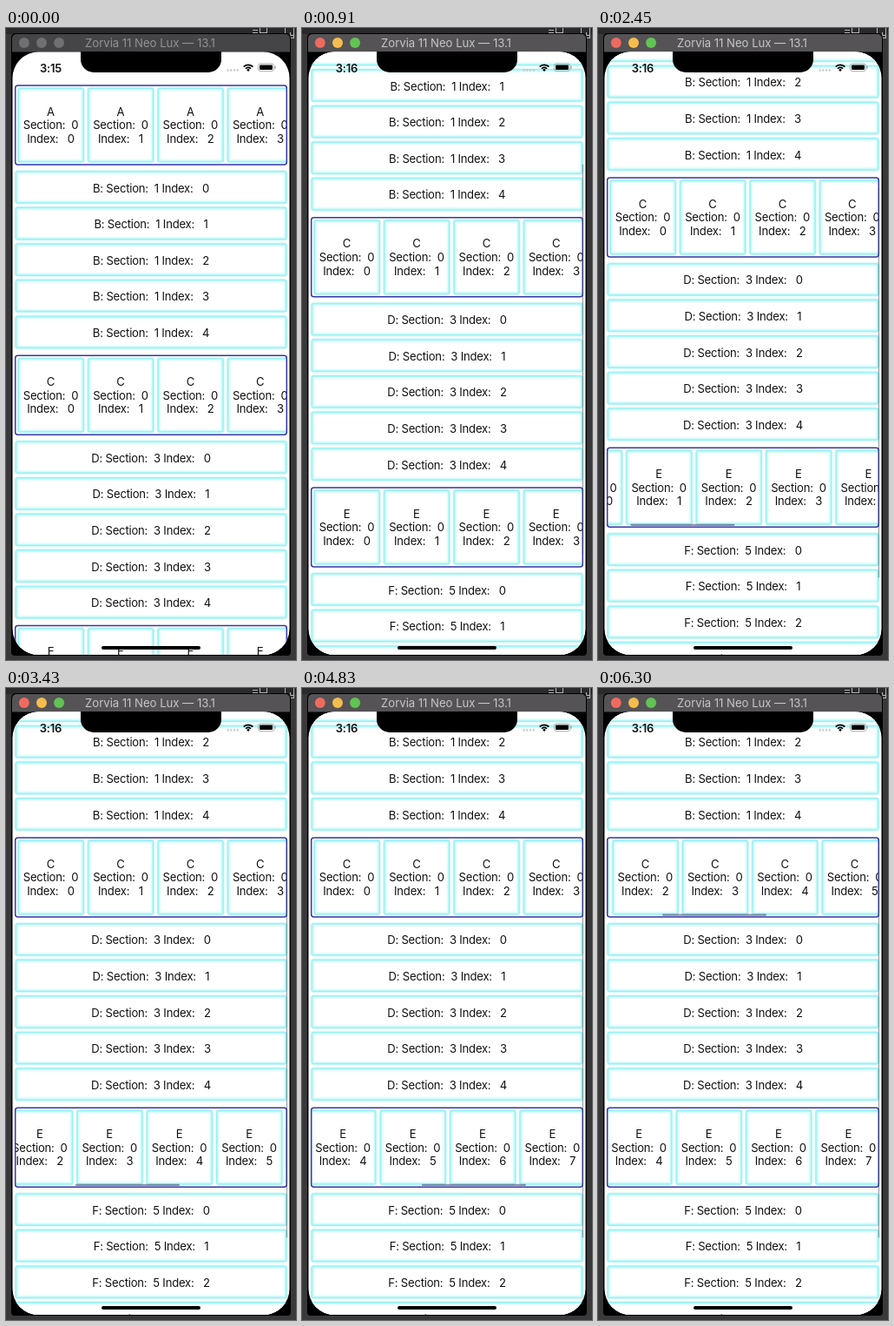
Animation, 334 px wide and 726 px high, one loop 6440 ms. Source, as an HTML page with a canvas:

```html
<!DOCTYPE html>
<html lang="en">
<head>
<meta charset="utf-8">
<style>
html, body { margin: 0; width: 100%; height: 100%; overflow: hidden; background: #39393b; }
canvas { display: block; }
</style>
</head>
<body>
<canvas id="stage" width="334" height="726"></canvas>
<script>
const ctx = document.getElementById('stage').getContext('2d');
const LOOP = 6440, STEP = 70;
const PERIOD = 310.3;      // one card strip plus its five rows
const ROW_PITCH = 41.6, CELL_PITCH = 80.4;
const SCROLL_STOP = 204.4;

function ease(t, start, end) {
  const u = Math.min(1, Math.max(0, (t - start) / (end - start)));
  return (1 - Math.cos(Math.PI * u)) / 2;
}

function roundPath(x, y, w, h, r) {
  ctx.beginPath();
  ctx.roundRect(x, y, w, h, r);
}

function box(x, y, w, h, r, color) {
  roundPath(x, y, w, h, r);
  ctx.fillStyle = color;
  ctx.fill();
}

function dot(x, y, r, color) {
  ctx.beginPath();
  ctx.arc(x, y, r, 0, Math.PI * 2);
  ctx.fillStyle = color;
  ctx.fill();
}

function label(text, x, y, color = '#111', weight = 400, size = 13.1, spacing = -0.22) {
  ctx.font = `${weight} ${size}px Inter, sans-serif`;
  ctx.letterSpacing = spacing + 'px';
  ctx.textAlign = 'center';
  ctx.textBaseline = 'alphabetic';
  ctx.fillStyle = color;
  ctx.fillText(text, x, y + 4.7);
}

// White tile with a cyan edge that fades inwards.
function tile(x, y, w, h) {
  box(x - 1, y - 1, w + 2, h + 2, 4, '#e2fafa');
  box(x, y, w, h, 3, '#fff');
  ctx.save();
  roundPath(x, y, w, h, 3);
  ctx.clip();
  for (const [width, alpha] of [[10, 0.05], [7, 0.1], [5, 0.17], [3, 0.36]]) {
    ctx.strokeStyle = `rgba(70, 228, 232, ${alpha})`;
    ctx.lineWidth = width;
    ctx.stroke();
  }
  ctx.restore();
}

function strip(letter, y, offset, showBar) {
  ctx.save();
  roundPath(10.5, y, 313, 92, 3);
  ctx.clip();
  for (let i = 0; i < 10; i++) {
    const x = 13.5 + i * CELL_PITCH - offset;
    if (x < -80 || x > 334) continue;
    tile(x, y + 3, 76.5, 86);
    label(letter, x + 38, y + 30.5);
    label('Section:  0', x + 38, y + 46.2);
    label('Index:   ' + i, x + 38, y + 61.8);
  }
  if (showBar) box(14 + offset * 0.38, y + 88, 120, 2.3, 1.1, 'rgba(70, 75, 110, .6)');
  ctx.restore();
  roundPath(10.7, y + 0.5, 312.6, 91, 3);
  ctx.strokeStyle = '#3636a6';
  ctx.lineWidth = 1.5;
  ctx.stroke();
}

function rows(letter, section, y) {
  for (let i = 0; i < 5; i++) {
    const top = y + i * ROW_PITCH;
    if (top < -20 || top > 726) continue;
    tile(10.5, top, 313, 37.8);
    label(`${letter}: Section:  ${section} Index:   ${i}`, 167, top + 19.8);
  }
}

function statusBar(clock) {
  label(clock, 51.5, 45.8, '#111', 600, 13, -0.2);
  for (let i = 0; i < 4; i++) dot(255.5 + i * 3.8, 48.5, 1.2, '#c9c9c9');
  ctx.strokeStyle = '#000';
  ctx.lineWidth = 1.8;
  for (const r of [3.9, 7]) {
    ctx.beginPath();
    ctx.arc(279, 49.3, r, -Math.PI * 0.77, -Math.PI * 0.23);
    ctx.stroke();
  }
  dot(279, 48.3, 1.4, '#000');
  roundPath(290.5, 41, 18, 8.6, 2.5);
  ctx.strokeStyle = '#999';
  ctx.lineWidth = 0.8;
  ctx.stroke();
  box(292, 42.5, 15, 5.6, 1.3, '#000');
  box(309.5, 43.8, 1.2, 3, 0.6, '#999');
}

function desktop() {
  ctx.fillStyle = '#39393b';
  ctx.fillRect(0, 0, 334, 726);
  ctx.fillStyle = '#2a292b';
  ctx.fillRect(0, 0, 334, 7);
  ctx.fillStyle = '#b5b5b7';
  for (const y of [2, 5]) ctx.fillRect(284, y, 6, 1);
  ctx.strokeStyle = '#b5b5b7';
  ctx.lineWidth = 1;
  ctx.strokeRect(292.5, -2.5, 8, 8);
  ctx.strokeRect(321.5, -2.5, 10, 14);
  ctx.fillRect(324, 8, 7, 1);
  ctx.fillRect(327, 5, 1, 7);
}

function windowFrame(active) {
  box(6, 6, 322, 715, [5, 5, 4, 4], '#000');
  box(7, 7, 320, 20.5, [5, 5, 0, 0], active ? '#555355' : '#454446');
  const lights = active ? ['#ee6a5f', '#f5bd4f', '#61c454'] : ['#706f71', '#706f71', '#706f71'];
  lights.forEach((color, i) => dot(20.9 + i * 20.1, 17, 6, color));
  label('Zorvia 11 Neo Lux — 13.1', 166, 17, active ? '#c6c5c7' : '#929193', 400, 13.2, -0.05);
}

function draw(t) {
  const active = t >= 70;
  const scroll = Math.min(SCROLL_STOP, (SCROLL_STOP + 1) * ease(t, 199, 1240));
  const offsetE = 173.5 * ease(t, 2100, 2960) + 152.5 * ease(t, 3550, 4430);
  const offsetC = 158 * ease(t, 4840, 5620);

  desktop();
  windowFrame(active);

  ctx.save();
  roundPath(7.5, 27.5, 319, 692.5, 30);
  ctx.clip();
  ctx.fillStyle = '#fff';
  ctx.fillRect(0, 27, 334, 694);
  const strips = [
    ['A', 'B', 0, false],
    ['C', 'D', offsetC, t >= 4900],
    ['E', 'F', offsetE, t >= 2100 && t < 5100],
  ];
  strips.forEach(([cardLetter, rowLetter, offset, showBar], i) => {
    const y = 65.5 + i * PERIOD - scroll;
    strip(cardLetter, y, offset, showBar);
    rows(rowLetter, i * 2 + 1, y + 98.5);
  });
  if (scroll > 0) box(322.7, 63 + scroll * 0.59, 1.4, 448, 0.7, 'rgba(60, 85, 95, .5)');
  statusBar(active ? '3:16' : '3:15');
  box(110, 710, 114, 4, 2, '#000');
  ctx.restore();

  box(86, 27, 162, 24, [0, 0, 15, 15], '#000');
}

function tick() {
  const t = performance.now() % LOOP;
  draw(Math.floor(t / STEP) * STEP);
  requestAnimationFrame(tick);
}
tick();
</script>
</body>
</html>
```
